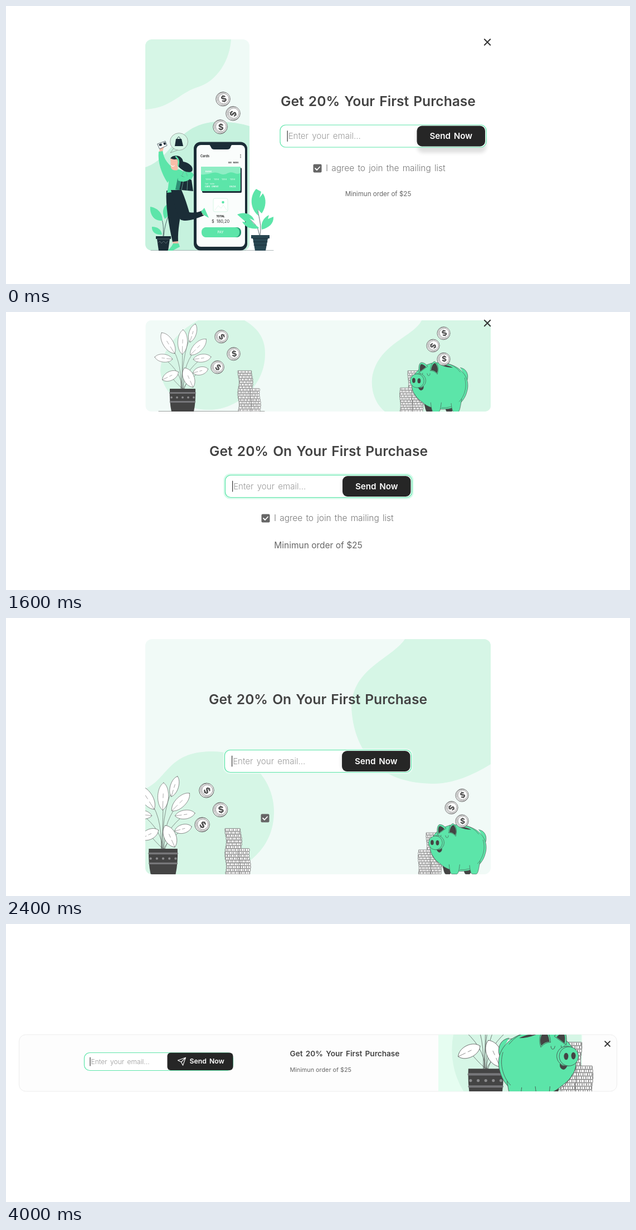
Write an HTML page that moves like this. It is 1120 by 500 pixels and loops after 4.8 s.

```html
<!DOCTYPE html>
<html lang="en">
<head>
<meta charset="utf-8">
<title>Discount pop-ups</title>
<style>
  html, body { margin: 0; width: 100%; height: 100%; overflow: hidden; background: #fff; }
  svg { display: block; width: 1120px; height: 500px; font-family: Inter, sans-serif; word-spacing: .12em; }
  .fine { word-spacing: 0; }
</style>
</head>
<body>
<svg id="stage" viewBox="0 0 1120 500"></svg>
<script>
const SLIDE_MS = 800;
const GREEN = '#5ce5a9', MINT = '#d6f6e6', PALE = '#f1faf7', DARK = '#444', NAVY = '#1b2d37', INK = '#434343', SKIN = '#f8bda8';

// Basic shapes
const path = (d, fill = 'none', stroke = 'none', width = 0.9) =>
  `<path d="${d}" fill="${fill}" stroke="${stroke}" stroke-width="${width}" stroke-linecap="round" stroke-linejoin="round"/>`;
const rect = (x, y, w, h, r, fill, more = '') =>
  `<rect x="${x}" y="${y}" width="${w}" height="${h}" rx="${r}" fill="${fill}" ${more}/>`;
const oval = (x, y, rx, ry, fill, more = '') =>
  `<ellipse cx="${x}" cy="${y}" rx="${rx}" ry="${ry}" fill="${fill}" ${more}/>`;
const text = (x, y, size, weight, fill, words, anchor = 'start') =>
  `<text x="${x}" y="${y}" font-size="${size}" font-weight="${weight}" fill="${fill}" text-anchor="${anchor}">${words}</text>`;
const group = (attrs, ...parts) => `<g ${attrs}>${parts.join('')}</g>`;
const use = (id, transform = '') => `<use href="#${id}" transform="${transform}"/>`;
const clip = (id, x, y, w, h, r) => `<clipPath id="${id}">${rect(x, y, w, h, r, '#000')}</clipPath>`;
const outline = `stroke="${DARK}" stroke-width=".9"`;

// Illustration parts
const coin = (x, y, r, turn) => group(`transform="translate(${x} ${y}) scale(${r / 18})"`,
  oval(-0.8, 0.5, 17.5, 17.5, '#fff', `stroke="${DARK}" stroke-width="1.2"`),
  oval(1, -0.3, 16, 16, '#fff', outline),
  oval(1, -0.3, 13, 13, '#fff', outline),
  `<g transform="rotate(${turn})">${text(1, 7.6, 21, 700, DARK, '$', 'middle')}</g>`);

function stack(x, w, top, bottom, step) {
  let out = '';
  for (let i = 0, y = bottom - step; y >= top - 0.5; i++, y -= step) {
    const left = x + 1.3 * Math.sin(i * 7);
    const mid = y + step / 2;
    out += rect(left, y, w, step, 1, '#fff', `stroke="${DARK}" stroke-width="${step / 8}"`) +
      `<path d="M${left + 1} ${mid}h${w - 2}" stroke="#555" stroke-width="${step * 0.65}" stroke-dasharray="${step * 0.13} ${step * 0.4} ${step * 0.2} ${step * 0.6}" stroke-dashoffset="${i * 3}"/>`;
  }
  return out;
}

// x, y, half length, half width, turn; the origin is the middle of the pot's base
const leaves = [
  [-26, -123, 22, 9, -32], [18, -141, 17, 6.5, 17], [0, -125, 22, 8.5, 2],
  [-34, -96, 16, 7, -83], [28, -116, 20, 8, 45], [35, -96, 16, 7, 82],
  [32, -73, 14, 7, 75], [-22, -64, 16, 8, 64], [11, -61, 19, 9.5, -24]
];
const leaf = ([x, y, l, w, turn]) => group(`transform="translate(${x} ${y}) rotate(${turn})"`,
  path(`M0 ${-l}C${w * 1.3} ${-l * 0.7} ${w * 1.4} ${l * 0.6} 0 ${l}C${-w * 1.4} ${l * 0.6} ${-w * 1.3} ${-l * 0.7} 0 ${-l}Z`, '#fff', DARK, 0.5),
  path(`M0 ${l}V${l * 0.35}M0 ${l * 0.1}V${-l * 0.2}`, 'none', DARK, 0.4));
const plant = leaves.map(([x, y], i) => path(`M${(i - 4) * 0.8} -41Q${x * 0.05} ${y + 25} ${x} ${y}`, 'none', DARK, 0.5)).join('') +
  leaves.map(leaf).join('') +
  path('M-23 -41H23Q24 -18 20 0H-20Q-24 -18 -23 -41Z', DARK) +
  path('M-22.5 -33.5H22.5M-21.8 -17.5H21.8', 'none', '#77777a', 3) +
  [-20, -10, 0, 10, 20].map(x => oval(x, -25.3, 1.9, 1.9, '#8a8a8c')).join('');

const pig =
  stack(679, 28, 326, 440, 6.7) + stack(690, 29, 400, 440, 6.7) + stack(657, 33, 372, 440, 6.7) +
  path('M723 412Q727 440 732 440H743Q748 434 746 412ZM780 418Q782 440 787 440H797Q804 434 803 412Z', DARK, DARK) +
  path('M822 318C838 320 846 336 841 352', GREEN, DARK) +
  path('M742 306C770 300 810 308 828 330C842 345 846 365 840 384C834 408 815 427 790 431C765 434 740 431 722 416C705 403 695 395 690 375C686 345 700 318 742 306Z', GREEN, DARK) +
  path('M741 414C743 437 746 440 751 440H760C767 440 768 430 770 414M797 416C799 437 802 440 807 440H814C821 440 822 424 826 404', GREEN, DARK) +
  path('M834 346C842 372 832 398 819 411M696 389C708 412 724 424 741 427M771 428Q784 429 797 425M780 305Q806 309 822 330', 'none', DARK, 0.8) +
  path('M709 331C707 316 709 307 714 304C720 303 728 307 732 314Z', GREEN, DARK) +
  path('M712 328C710 316 712 309 715 308C720 308 725 312 728 316Z', DARK) +
  path('M740 326C741 311 745 302 752 301C760 306 764 320 759 336Q751 326 740 326Z', GREEN, DARK) +
  path('M742 325C743 314 747 306 753 305C760 312 762 324 758 333Q751 325 742 325Z', DARK) +
  path('M769 311Q786 309 802 318Q785 318 769 311Z', DARK) +
  path('M731 334Q732 340 735 340Q739 340 739 334M712 333Q713 338 716 338Q719 337 719 333', 'none', DARK) +
  path('M707 372Q716 376 721 369Q722 379 714 380Q709 379 707 372Z', DARK, DARK) +
  oval(708, 353.5, 19.5, 19.5, GREEN, outline) + oval(703.5, 354, 19, 19, GREEN, outline) +
  oval(694.5, 353, 4.4, 7, DARK) + oval(709, 354, 4.4, 7, DARK) +
  coin(777, 223, 18, -20) + coin(748, 257, 18, 115) + coin(777, 294, 18, 0);

const savings = group('transform="translate(317 179)"', plant) +
  stack(417, 25, 105, 179, 4.6) + stack(439, 17, 135, 179, 4.6) +
  coin(387, 44, 12, 50) + coin(409, 75, 12, -8) + coin(380, 99, 12, 35);

const scene = use('plant', 'translate(868 440) scale(-1.5 1.5)') + use('pig');

const defs = `<defs>
  <filter id="blur" x="-30%" y="-60%" width="160%" height="220%"><feGaussianBlur stdDeviation="3"/></filter>
  <g id="plant">${plant}</g><g id="pig">${pig}</g><g id="savings">${savings}</g><g id="scene">${scene}</g>
  <g id="blob">${path('M679 217A158 158 0 0 1 935 341A158 158 0 0 1 898 443H679Z', MINT)}</g>
  ${clip('phoneCard', 250, 60, 187, 380, 12)}
  ${clip('pigCard', 684, 60, 186, 380, 12)}${clip('pigCardWide', 600, 60, 270, 381, 12)}
  ${clip('banner', 250.5, 15, 619.5, 164, 10)}${clip('panel', 250, 38, 620, 423, 12)}
  ${clip('leftBar', 0, 197, 320, 106, 10)}${clip('rightBar', 776, 199, 320, 102, 0)}
</defs>`;

// Interface parts
const heading = (x, y, words) => text(x, y, 24.6, 600, INK, words, 'middle');
const fine = (x, y, size, words, anchor) => group('class="fine"', text(x, y, size, 400, '#666', words, anchor));
const minimum = (x, y, size) => fine(x, y, size, 'Minimun order of $25', 'middle');
const close = (x, y, r = 5.2) => path(`M${x - r} ${y - r}l${2 * r} ${2 * r}m0 ${-2 * r}l${-2 * r} ${2 * r}`, 'none', '#333', 2);
const checkbox = (x, y) => rect(x - 7.5, y - 7.5, 15, 15, 2, '#666') +
  path(`M${x - 4} ${y}l3 3l5 -5.5`, 'none', '#fff', 1.8);
const agree = (x, y) => checkbox(x, y) + text(x + 15, y + 5.4, 15.4, 300, '#777', 'I agree to join the mailing list');
const blurred = (x, y, w, h, fill, opacity) => rect(x, y, w, h, 10, fill, `opacity="${opacity}" filter="url(#blur)"`);

function field(x, y, w, h, size, glow) {
  const mid = y + h / 2, inset = size * 0.87;
  return (glow ? rect(x - 3, y - 3, w + 6, h + 6, 12, glow, 'opacity=".75"') : '') +
    rect(x, y, w, h, 10, '#fff', `stroke="${GREEN}" stroke-width="1.2"`) +
    path(`M${x + inset} ${mid - size * 0.62}V${mid + size * 0.62}`, 'none', '#222', 1.1) +
    text(x + inset + 1.5, mid + size * 0.34, size, 300, '#999', 'Enter your email...');
}
function button(x, y, w, h, size, icon = false) {
  const base = y + h / 2 + size * 0.34;
  const plane = `<g transform="translate(${x + 19} ${y + h / 2 - 7})">` +
    path('M14 0L0 5L6 8L9 14ZM14 0L6 8', 'none', '#fff', 1.1) + '</g>';
  return rect(x, y, w, h, icon ? 6 : 9, '#262626') + (icon
    ? plane + text(x + 40, base, size, 600, '#fff', 'Send Now')
    : text(x + w / 2, base, size, 600, '#fff', 'Send Now', 'middle'));
}
const form = (x, y, w, glow) => field(x, y, w, 40, 15.1, glow) +
  blurred(x + w - 126, y + 6, 12, 30, '#000', 0.1) + button(x + w - 124.5, y + 1.5, 122.5, 37, 15.2);

// Shopper with phone
const shopper =
  // potted plant on the left
  path('M282 415C284 390 280 380 271 368M283 414Q285 390 294 372', 'none', NAVY, 0.7) +
  path('M281 386C263 387 258 372 259 361C271 363 281 371 281 386ZM285 383C279 370 282 360 291 356C297 366 294 377 285 383ZM280 411C266 413 261 403 262 397C272 397 279 402 280 411Z', GREEN) +
  path('M269 414H296V419H294L291 440H274L271 419H269Z', NAVY) + path('M271 419H294M273 426l3 -3l3 4l4 -4l4 4l3 -4', 'none', '#7b8b91', 0.6) +
  // standing leg
  path('M288 332C286 358 292 392 299 425L309 424C308 400 313 384 315 360L312 332Z', NAVY) +
  path('M299 424L309 423V428H300Z', SKIN) + path('M300 427L310 427L312 433L299 440H290Q297 434 300 427Z', GREEN) +
  // torso and raised arm
  path('M306 300Q333 292 337 304L329 318Z', GREEN) +
  path('M291 298C303 289 317 294 322 302L314 333L289 336Q294 316 291 298Z', GREEN) +
  path('M290 318C279 301 272 281 274 262L281 259C283 276 291 285 304 294Z', GREEN) +
  path('M275 262L277 252L285 250L281 261Z', SKIN) + path('M272 248L286 243L289 251L276 257Z', '#fff', NAVY, 0.7) +
  path('M274 249l5 -2l1 4l-4 1ZM282 246l4 -1l1 4l-3 1Z', NAVY) +
  // bags
  path('M311 304L333 313L336 333L305 330Z', NAVY) + path('M309 305L316 308L311 331L304 330Z', '#2e8f75') +
  path('M314 309L321 293L328 313M319 311L315 331M326 313L325 332', 'none', '#6fae9c', 0.8) +
  path('M306 298Q322 316 331 300L335 304Q326 321 309 314Z', GREEN) +
  // head
  path('M300 271C308 266 317 272 318 280C327 281 338 289 334 297C327 302 316 296 309 288Z', NAVY) +
  path('M295 274Q304 270 309 279L308 295Q299 297 296 291Z', SKIN) +
  path('M295 274Q300 267 310 271Q307 279 295 274Z', NAVY) + path('M305 271Q312 277 309 287', 'none', GREEN, 2.5) +
  path('M297 287Q300 290 302 287', 'none', '#fff', 1.2) +
  // thought bubble
  path('M301 256L295 264L309 259', 'none', '#777', 0.6) + oval(310.5, 244, 16, 15.5, MINT, 'stroke="#777" stroke-width=".6"') +
  path('M305 239H315L318 252H303Z', NAVY) + path('M307 239Q310 231 313 239', 'none', NAVY, 0.9);

const kickingLeg =
  path('M296 331H315C321 344 325 358 329 371Q341 373 352 368L355 377C338 384 322 389 313 384C306 374 302 354 296 331Z', NAVY) +
  path('M351 369l5 -2l2 7l-5 2Z', SKIN) + path('M350 370L356 363L364 381L355 376Z', GREEN);

const phone =
  rect(337, 244.5, 96, 195, 12, NAVY) + rect(342, 250, 87, 183, 8, '#fafdfc') +
  path('M365 249H407Q404 250 403 254Q402 258 397 258H374Q369 258 368 254Z', NAVY) +
  text(349, 272, 5.6, 600, '#222', 'Cards') + [267.5, 270, 272.5].map(y => oval(421, y, 0.7, 0.7, '#222')).join('') +
  text(417.5, 283, 3.3, 700, '#333', 'SEE MORE', 'end') +
  rect(352, 291, 71, 45, 2, NAVY) + rect(350, 289, 71, 44, 2, GREEN) +
  path('M350 289H421V300C412 306 409 295 397 301C387 307 382 297 371 300Q360 304 350 303Z', '#8eedc4') +
  text(358, 299, 4, 600, '#fff', 'BANK') +
  [358, 373, 387, 402].map(x => text(x, 313, 4, 400, '#fff', '1234')).join('') +
  text(357, 321, 2.8, 400, '#fff', 'Card holder') + text(357, 326, 3.9, 600, '#fff', 'Card Owner') + text(401, 326, 3.9, 600, '#fff', '09/24') +
  rect(372, 346, 26, 24, 3, '#fff', `stroke="${MINT}" stroke-width="1"`) + path('M375 367l6 -8l5 5l4 -6l6 9', 'none', MINT, 0.7) + oval(389.5, 353, 2.3, 2.3, GREEN) +
  text(385, 380, 4.6, 800, '#222', 'TOTAL', 'middle') + text(385, 390, 7.4, 400, '#333', '$ 180,20', 'middle') +
  rect(353, 398, 69, 18, 8, '#269a74') + rect(351, 398, 68, 18, 8, GREEN) + text(385, 409.3, 6, 400, '#fff', 'PAY', 'middle');

const rightPlant =
  path('M456 412C461 387 447 371 452 341M455 412Q452 390 429 378', 'none', NAVY, 0.7) +
  path('M449 329C437 342 438 365 453 377L451 365L459 373C467 362 468 346 461 337L455 345L458 334ZM415 375C425 370 441 372 446 386L437 382L444 391C449 395 454 398 454 400C437 402 429 397 424 388L431 389ZM459 402C457 390 462 381 472 376L470 383L480 379C481 391 472 399 459 402Z', GREEN) +
  path('M440 412H473V418H470L466 440H447L443 418H440Z', '#294752') + path('M443 418H470M444 424H469M445 430H468', 'none', NAVY, 1.2);

const slides = [
  group('clip-path="url(#phoneCard)"',
    rect(250, 60, 187, 380, 0, '#effaf6'),
    path('M404 60C402 95 381 136 341 147C311 157 295 184 250 186V60Z', MINT),
    path('M250 290C300 274 305 208 385 208Q415 209 437 216V440H250Z', '#c6f2de')) +
  path('M260 439.5H480', 'none', '#8d9a9c', 0.7) +
  shopper + phone + kickingLeg + rightPlant +
  coin(390, 167, 13, -18) + coin(408, 193, 13, 110) + coin(385, 217, 13, 0) +
  close(864, 65) + heading(668, 179.5, 'Get 20% Your First Purchase') +
  blurred(738, 232, 124, 32, '#000', 0.12) + form(492, 214, 370) + agree(559, 292) + minimum(668, 342, 11.6),

  group('clip-path="url(#pigCard)"',
    rect(684, 60, 186, 380, 0, '#f1faf8'),
    path('M713 60C722 93 741 117 770 127C801 136 815 165 870 166V60Z', MINT), use('blob')) +
  group('clip-path="url(#pigCardWide)"', path('M655 440H870', 'none', DARK, 0.8), use('scene')) +
  close(864, 65) + heading(459.5, 178.5, 'Get 20% Your First Purchase') +
  form(291.5, 213, 335.5) + agree(350, 291) + minimum(459.5, 343.5, 11.6),

  group('clip-path="url(#banner)"',
    rect(250, 15, 620, 164, 0, PALE),
    path('M345 15C305 35 277 75 277 106C280 140 310 178 370 176C420 172 465 130 465 75C465 45 450 28 428 15Z', MINT),
    path('M746 15C732 45 665 58 657 120C655 147 666 168 680 179H870V15Z', MINT),
    path('M274 179H464', 'none', DARK, 1),
    use('savings'), use('pig', 'translate(277 -108.1) scale(.655)')) +
  close(864, 20) + heading(561, 259, 'Get 20% On Your First Purchase') +
  form(393.5, 293.5, 335, '#c9f8e3') + agree(466, 371) + minimum(560.5, 424.5, 15.5),

  group('clip-path="url(#panel)"',
    rect(250, 38, 620, 423, 0, PALE),
    path('M716 38C690 75 622 90 620 160C622 210 645 298 768 298C810 298 850 275 870 263V38Z', MINT),
    path('M250 307C290 290 290 240 370 240C440 240 482 295 481 350C480 410 440 440 400 461H250Z', MINT),
    use('savings', 'translate(-73 260.5) scale(1.12)'), use('pig', 'translate(310 172.5) scale(.655)')) +
  heading(560, 154.5, 'Get 20% On Your First Purchase') + form(392.5, 237.5, 335, '#e9fbf3') + checkbox(465, 360),

  group('clip-path="url(#leftBar)"',
    rect(0, 197, 251, 106, 0, '#e6fcf1'),
    use('blob', 'matrix(-.95 0 0 .95 895.8 -89.3)'), use('scene', 'matrix(-.95 0 0 .95 895.8 -89.3)')) +
  text(339, 233, 14.2, 600, INK, 'Get 20% Your First Purchase') + path('M340 244H364', 'none', GREEN, 1.7) +
  fine(339, 263, 11.4, 'Minimun order of $25 Minimun order') +
  fine(339, 278.5, 11.4, 'of $25 Minimun order of $25 Minimun') +
  field(568, 233.5, 280, 34, 12.7, '#e3fbf0') +
  blurred(860, 246, 127, 30, '#000', 0.14) + button(860, 233.5, 124, 34, 12.8, true) + close(1103, 214, 4.4),

  rect(23.5, 199, 1073, 102, 12, '#fdfdfd', 'stroke="#ededed"') +
  group('clip-path="url(#rightBar)"',
    rect(776, 199, 258, 102, 0, '#e6fdf1'),
    use('blob', 'matrix(-.907 0 0 .907 1648.4 -83.1)'), use('scene', 'matrix(-.907 0 0 .907 1648.4 -83.1)')) +
  field(140.5, 231.5, 267, 32, 12.1) + button(289.5, 231.5, 118, 31.5, 12.3, true) +
  text(509.5, 237.5, 13.6, 600, INK, 'Get 20% Your First Purchase') +
  fine(509.5, 266, 10.8, 'Minimun order of $25') + close(1079.5, 215.5, 4.4)
];

const stage = document.getElementById('stage');
stage.innerHTML = defs + slides.map(body => group('class="slide" visibility="hidden"', body)).join('');
const slideNodes = stage.querySelectorAll('.slide');
const start = performance.now();

function draw() {
  const current = Math.floor((performance.now() - start) / SLIDE_MS) % slides.length;
  slideNodes.forEach((node, i) => node.setAttribute('visibility', i === current ? 'visible' : 'hidden'));
  requestAnimationFrame(draw);
}
draw();
</script>
</body>
</html>
```
